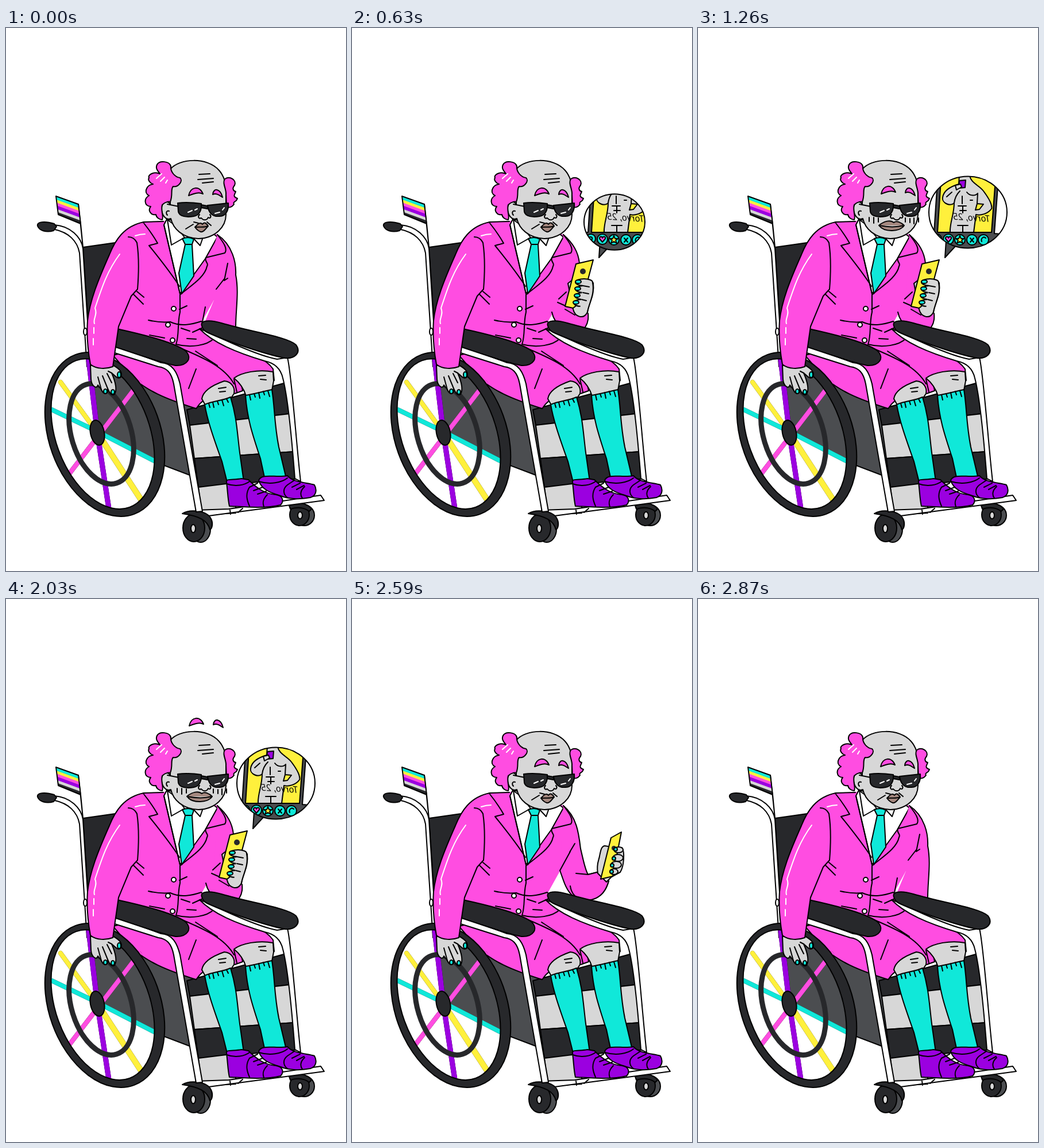
Write an HTML page that moves like this. It is 592 by 946 pixels and loops after 2940 ms.

```html
<!DOCTYPE html>
<html lang="en">
<head>
<meta charset="utf-8">
<title>Swipe surprise</title>
<style>
html, body { margin: 0; width: 100%; height: 100%; overflow: hidden; background: #fff; }
svg { display: block; width: 100%; height: 100%; stroke: #000; stroke-width: 2; stroke-linejoin: round; stroke-linecap: round; fill: none; }
.p { fill: #ff4de1; } .s { fill: #d7d7d7; } .k { fill: #27282b; } .d { fill: #4b4d50; }
.c { fill: #10e8d9; } .v { fill: #9b00e0; } .y { fill: #fff03c; } .w { fill: #fff; } .l { fill: #a5887f; }
.n { stroke: none; } .hi { stroke: #fff; }
.spoke path { stroke-width: 8; } .spoke use { stroke-width: 4; }
text { font: italic 16px "Open Sans", sans-serif; fill: #000; stroke: none; }
</style>
</head>
<body>
<svg viewBox="0 0 592 946">
<defs>
  <clipPath id="flag"><path d="M87 293L126 307L130 341L91 325Z"/></clipPath>
  <clipPath id="lens"><ellipse class="round"/></clipPath>
</defs>

<!-- flag and chair back -->
<path class="w" d="M126 307L134 382L130 341"/>
<g clip-path="url(#flag)" class="n">
  <g transform="translate(86 292.500) skewY(20)">
    <path class="c" d="M0 0H46V7H0Z"/><path class="y" d="M0 6H46V12H0Z"/><path class="p" d="M0 11H46V17H0Z"/>
    <path class="v" d="M0 16H46V23H0Z"/><path class="s" d="M0 22H46V28H0Z"/><path class="k" d="M0 27H46V36H0Z"/>
  </g>
</g>
<path d="M87 293L126 307L130 341L91 325Z"/>
<path class="k" d="M134 382L190 374L205 400L150 510L142 500Z"/>
<path class="w" d="M84 343C112 345 131 364 134 384L147 590H141L128 392C124 370 108 356 85 351Z"/>
<path class="k" d="M55 345C53 337 68 336 84 341L88 346L83 353C70 357 58 353 55 345Z"/>
<ellipse class="w" cx="138" cy="529" rx="3" ry="6"/>

<!-- seat side and calf straps -->
<path class="d" d="M147 590H215L325 660L333 784L262 757L155 700Z"/>
<path class="k" d="M315 665L487 618L494 672L320 692Z"/>
<path class="s" d="M320 692L494 672L502 738L328 750Z"/>
<path class="k" d="M328 750L502 738L510 785L335 800Z"/>
<path class="s" d="M335 800L400 792V845L341 848Z"/>

<!-- shorts and legs -->
<path class="p" d="M186 570L300 545L362 540C410 560 450 572 465 594L467 614L455 602L408 610L412 632L398 637C340 640 338 655 331 663C290 650 235 632 205 592Z"/>
<path d="M300 556C345 575 380 590 397 620M330 563L368 588M318 628L331 594"/>
<path class="s" d="M341 646C343 632 360 622 380 615C394 616 399 628 397 637L391 646L347 657Z"/>
<path class="s" d="M397 610C410 600 440 594 465 599L466 615L463 631L418 641C414 628 407 618 397 610Z"/>
<path d="M370 628L383 626M372 634L382 633M440 606L452 605M443 612L453 613M397 612L402 634"/>
<path class="c" d="M346 656C360 650 378 649 391 643C402 680 402 700 407 740L414 790L386 795L376 755C358 705 350 680 346 656Z"/>
<path class="c" d="M417 640C430 638 448 633 463 630C468 660 467 690 475 730L488 785L452 792L443 750C428 705 420 680 417 640Z"/>
<path d="M353 654L355 661M360 652L362 661M368 650L370 656M376 648L379 658M384 646L387 652M424 639L426 648M432 637L434 643M440 635L442 645M448 633L450 639M456 632L459 642"/>

<!-- jacket -->
<path class="p n" d="M213 350L240 338L275 336L368 360C390 380 392 410 386 428L362 474L341 512L362 541C350 553 322 558 296 551L190 545L200 500Z"/>
<path class="w" d="M280 333L275 343L303 463L347 402L368 364L350 350Z"/>

<!-- far arm -->
<g id="rest">
  <path class="p n" d="M368 360C395 378 401 410 400 430C406 460 400 490 400 530L345 515L362 474L350 420Z"/>
  <path d="M368 360C395 378 401 410 400 430C406 460 400 490 400 520M386 410L380 440L386 436M347 486L342 512M380 437L366 455"/>
</g>
<g id="out">
  <path class="p n" d="M368 360C392 380 395 410 398 435C404 460 406 472 411 480L427 476L447 491C442 510 430 524 408 525C385 525 375 510 368 490L362 473L365 420Z"/>
  <path d="M368 360C392 380 395 410 398 435C404 460 406 472 411 480L427 476L447 491C442 510 430 524 408 525C385 525 375 510 368 490L362 473M388 426L379 441M362 473L380 440M395 486L411 480"/>
</g>
<g id="swing">
  <path class="p" d="M390 478L411 480L427 476L447 491C442 510 430 524 408 525C392 524 382 515 380 500"/>
  <path class="s" d="M428 478C425 462 430 455 431 448C433 438 434 431 440 430L452 432L470 433C475 440 474 465 467 476L452 484L443 493Z"/>
  <path class="y" d="M451 416L469 406L454 483L433 488Z"/>
  <circle class="k n" cx="456" cy="434" r="4"/>
  <g class="s"><ellipse cx="464" cy="437" rx="8" ry="5"/><ellipse cx="463" cy="451" rx="9" ry="6"/><ellipse cx="460" cy="463" rx="9" ry="6"/><ellipse cx="456" cy="475" rx="7" ry="5"/></g>
  <g class="c"><circle cx="459" cy="436" r="3"/><circle cx="456" cy="452" r="3"/><circle cx="453" cy="464" r="3"/><circle cx="452" cy="475" r="3"/></g>
</g>
<g id="near">
  <path class="p n" d="M368 360C385 375 394 390 396 410L402 500L411 497C413 515 405 530 388 530C370 530 352 515 348 495L362 475L365 420Z"/>
  <path d="M368 360C385 375 394 390 396 410M411 497C413 515 405 530 388 530C370 530 352 515 348 495M358 478L376 486M360 472L373 460M371 490L388 500"/>
  <path class="s" d="M376 445C390 432 412 434 420 444C423 465 412 480 410 495C403 509 388 503 385 490Z"/>
  <path class="y" d="M390 411L420 404L401 475L385 488L371 485Z"/>
  <circle class="k n" cx="402" cy="424" r="5"/>
  <g class="s"><ellipse cx="404" cy="443" rx="15" ry="6"/><ellipse cx="404" cy="455" rx="15" ry="6"/><ellipse cx="403" cy="467" rx="15" ry="6"/><ellipse cx="399" cy="479" rx="13" ry="6"/></g>
  <path class="s n" d="M403 438L420 445C422 465 413 480 409 494L397 490Z"/>
  <path d="M419 444C423 465 412 480 410 495M402 449L413 451M402 461L412 463M400 473L408 475"/>
  <g class="c"><ellipse cx="394" cy="442" rx="5" ry="3"/><ellipse cx="393" cy="454" rx="5" ry="3"/><ellipse cx="392" cy="466" rx="5" ry="3"/><ellipse cx="390" cy="478" rx="5" ry="3"/></g>
</g>

<!-- jacket lines, shirt, tie -->
<path d="M213 350L240 338L274 337M240 340C252 355 260 368 264 375L249 379C270 405 286 425 302 450M275 343L303 463M368 360C380 375 386 385 381 392L348 400C345 408 354 409 350 415C346 435 320 450 304 464M303 463V495C298 515 302 535 296 551C322 558 350 553 362 541L341 512"/>
<path d="M248 509C265 513 275 513 286 512C305 521 325 516 340 511M250 535L276 540M305 523L320 528M302 490L315 484M315 541L331 542M222 464L239 481M228 459L240 469M325 530L347 520"/>
<path class="w" d="M281 334L288 378L311 365L296 345ZM325 365L338 379L345 359Z"/>
<path class="c" d="M312 377L324 377L327 432L306 463L301 427Z"/>
<path class="c" d="M307 367C315 364 322 365 327 368L324 377H312Z"/>
<g class="w"><circle cx="292" cy="489" r="4"/><circle cx="282" cy="517" r="4"/><circle cx="290" cy="544" r="4"/></g>

<!-- head -->
<path class="s" d="M286 246C302 227 350 224 371 248C382 260 384 275 383 292V325C383 346 365 366 335 367C308 366 291 350 287 332C278 336 270 325 271 312C273 302 283 300 286 308Z"/>
<path class="p" d="M287 241C285 232 267 230 263 238C259 246 267 251 268 254C258 249 246 256 249 261C246 265 252 271 256 272C243 274 240 288 249 292C240 297 240 310 252 311C246 318 253 327 261 325C262 331 268 334 272 334C275 328 269 318 272 308C278 302 285 302 286 303C291 290 286 281 291 276C300 278 309 266 303 261C294 260 286 250 287 241Z"/>
<path class="p" d="M381 263C390 257 402 265 398 274C393 280 396 284 400 285C398 291 394 293 403 297C401 304 394 302 397 307C391 316 386 310 384 314L383 290C384 280 376 271 381 263Z"/>
<path class="hi" d="M262 262L271 254M269 267L276 260M278 270L281 265"/>
<path d="M336 255L355 254M334 264L361 262M342 270L361 268M284 319C279 317 278 323 281 326M281 307L301 311"/>
<path class="k" d="M299 305C312 303 326 304 340 306C341 316 337 327 327 328C315 330 302 329 300 320ZM340 308L351 310V315L340 313ZM351 309L387 305C388 316 384 328 372 328C360 329 353 324 351 309Z"/>
<path class="hi" d="M317 321L324 318M329 317L333 315M364 323L372 321M377 317L380 313"/>
<path d="M337 325C333 329 336 333 340 331C344 336 350 335 352 330C356 333 358 328 355 325"/>
<g id="brows" class="p">
  <path d="M318 292C321 276 337 274 343 289C335 285 326 289 318 292Z"/>
  <path d="M360 290C361 278 373 279 377 295C372 292 367 287 360 290Z"/>
</g>
<g id="calm">
  <path d="M313 350L326 342M327 338L335 340M350 338L357 344"/>
  <path class="l" d="M329 347C335 340 339 338 342 342C345 337 349 340 352 345C346 352 343 356 339 355C335 354 332 351 329 347ZM329 347C338 346 345 348 352 345"/>
</g>
<g id="shock">
  <path d="M298 330V337M306 330V340M314 331V338M361 331V338M369 332V339M376 331V341M384 331V338"/>
  <path class="l" d="M315 344C324 336 335 334 341 339C346 335 354 339 359 344C352 355 325 357 315 344ZM315 344C330 347 347 347 359 344"/>
</g>

<!-- right rail and pad -->
<path class="w" d="M350 529C400 553 445 572 472 577L490 574C497 600 505 720 513 790L503 785C498 720 490 640 482 610C478 592 465 583 450 580C400 565 360 548 337 524Z"/>
<path class="k" d="M341 519C337 509 355 508 375 514C430 530 490 538 505 552C515 566 502 577 485 575C450 568 385 546 352 531C345 528 342 524 341 519Z"/>

<!-- footplate, shoes, casters -->
<g id="caster">
  <ellipse class="d" cx="519" cy="849" rx="18" ry="18"/>
  <ellipse class="k" cx="511" cy="848" rx="17" ry="19"/>
  <ellipse class="s" cx="512" cy="849" rx="4" ry="6"/>
  <path class="k" d="M493 832C505 825 525 827 532 838L528 842C518 834 505 835 495 838Z"/>
</g>
<path class="w" d="M330 840L388 838L548 814L554 823L412 842L345 851Z"/>
<path d="M390 840L391 847M404 844L412 837"/>
<path class="v" d="M440 788C445 775 470 784 490 780C500 792 525 792 537 796C542 805 540 815 530 818C510 822 490 820 478 815C462 810 445 805 440 788Z"/>
<path class="v" d="M384 792C382 784 395 788 410 785L422 787C435 800 450 812 470 813C483 815 484 825 478 831C450 838 410 834 389 833C386 820 386 805 384 792Z"/>
<path d="M384 794C400 800 416 796 424 790M424 800L438 793M431 806L447 800M438 812L453 807M424 800C416 812 420 824 424 833M455 813C448 820 446 826 449 834M440 790C460 796 480 792 490 784M490 796L502 788M498 800L512 793M506 804L519 797M490 796C480 804 484 814 490 818M520 799C512 806 512 814 516 819"/>
<ellipse class="d" cx="339" cy="873" rx="17" ry="23"/>
<ellipse class="k" cx="327" cy="871" rx="19" ry="24"/>
<ellipse class="s" cx="326" cy="872" rx="4" ry="7"/>
<path class="k" d="M307 846C320 838 350 840 357 855C361 863 359 872 355 874C351 857 335 850 307 846Z"/>

<!-- big wheel -->
<g class="spoke">
  <path id="s1" d="M95 617L159 705"/><use href="#s1" style="stroke:#fff03c"/>
  <path id="s2" d="M159 705L234 820" style="stroke-width:10"/><use href="#s2" style="stroke:#fff03c"/>
  <path id="s3" d="M232 618L106 782"/><use href="#s3" style="stroke:#ff4de1"/>
  <path id="s4" d="M80 665L159 703L258 754"/><use href="#s4" style="stroke:#10e8d9"/>
  <path id="s5" d="M144 578L159 705L179 837" style="stroke-width:9"/><use href="#s5" style="stroke:#9b00e0"/>
</g>
<ellipse cx="166" cy="707" rx="52" ry="90" transform="rotate(-17 166 707)" style="stroke:#27282b;stroke-width:9"/>
<ellipse class="k" cx="159" cy="705" rx="12" ry="22" transform="rotate(-12 159 705)"/>
<path class="k" fill-rule="evenodd" transform="translate(172 708) rotate(-20)" d="M-97 0A97 148 0 1 1 97 0A97 148 0 1 1 -97 0ZM-85 -2A82 136 0 1 1 79 -2A82 136 0 1 1 -85 -2Z"/>

<!-- left rail and pad -->
<path class="w" d="M188 553L270 583C290 584 298 600 303 620L342 842L331 843L292 620C288 600 280 592 265 590L186 565Z"/>
<path class="k" d="M193 524C230 532 290 546 312 562C326 575 315 589 295 588C265 582 225 567 188 555Z"/>

<!-- near arm on the wheel -->
<path class="s" d="M147 588L185 587C196 592 204 600 200 608C195 613 190 606 184 601C190 615 194 630 189 638C184 642 180 635 177 628C178 640 170 639 166 630L160 622C158 630 149 624 148 612Z"/>
<path d="M166 630L160 608M177 628L168 606M184 618L176 602M184 601L178 598"/>
<g class="c"><ellipse cx="197" cy="604" rx="3" ry="5"/><ellipse cx="186" cy="634" rx="3" ry="4"/><ellipse cx="173" cy="633" rx="3" ry="4"/></g>
<path class="p" d="M240 338C205 345 190 370 180 395C160 440 146 475 142 510C140 540 144 570 147 586C158 595 175 594 186 590L196 520L218 467L229 455C231 430 232 400 228 374C224 366 218 364 213 364"/>
<path class="hi" d="M225 362C231 360 236 359 242 359M198 394C175 425 166 455 155 488C160 500 151 506 154 515M153 522V532M152 541V552"/>

<!-- thought bubble -->
<g id="bubble">
  <path id="tail" class="d" d="M432 370L430 400L452 376Z"/>
  <g clip-path="url(#lens)">
    <path class="w n" d="M400 250H540V390H400Z"/>
    <path class="d" d="M418 250H524L516 358L540 360V400H400V356H411Z"/>
    <path class="y" d="M424 250H519L511 356H417Z"/>
    <path class="s" d="M455 256H473C474 270 490 274 497 284C506 296 513 308 511 315C504 324 492 327 484 325L480 356H439C438 340 446 325 446 305C438 312 424 304 426 295C428 282 440 276 454 272Z"/>
    <path class="y" d="M486 306L497 307L490 316L483 317Z"/>
    <path d="M446 305C447 296 452 288 456 284M468 286C474 294 484 292 487 288M487 288L486 306M460 293V306M453 310H467M456 318H467M461 310V322M452 344H470M461 345V356M433 294L442 286M474 300H478"/>
    <path class="v" d="M455 266L466 265L465 278L454 279Z"/>
    <path class="s" d="M448 274L457 272L459 277L450 282Z"/>
    <text transform="translate(508 338) scale(-1 1) rotate(-4)">Torvo, 25</text>
    <g class="c"><circle cx="416" cy="367" r="8"/><circle cx="436" cy="368" r="9"/><circle cx="456" cy="369" r="9"/><circle cx="477" cy="369" r="9"/><circle cx="497" cy="369" r="9"/></g>
    <path class="p" d="M436 373L431 367C431 362 436 363 436 366C437 362 442 363 441 367Z"/>
    <path class="y" d="M456 362L458 367H463L459 370L461 375L456 372L451 375L453 370L449 367H454Z"/>
    <path d="M474 366L480 373M480 366L474 373M501 366C497 362 492 367 494 372M414 364C420 363 419 369 415 371"/>
  </g>
  <ellipse class="round"/>
</g>
</svg>
<script>
const STEP = 70, COUNT = 42;
const GROW = [.2, .42, .6, .78, .9, 1];
const BROWS = { 12: -10, 13: -40, 14: -90, 15: -130, 16: -150, 17: -71, 29: -71, 30: -30 };
const el = id => document.getElementById(id);
const show = (id, on) => { el(id).style.display = on ? '' : 'none'; };
const rounds = document.querySelectorAll('.round');

function setBubble(size) {
  show('bubble', size > 0);
  const box = { cx: 411 + 59 * size, cy: 398 - 77 * size, rx: 68 * size, ry: 62.5 * size };
  for (const e of rounds) for (const k in box) e.setAttribute(k, box[k]);
  const t = Math.min(1, size * 1.3);
  el('tail').setAttribute('transform', `translate(430 400) scale(${t}) translate(-430 -400)`);
}

function draw(k) {
  // the way back mirrors the way in
  const m = k < 29 ? k : COUNT - 1 - k;
  show('rest', m < 4);
  show('out', m === 4);
  show('swing', m > 0 && m < 5);
  show('near', m > 4);
  el('swing').setAttribute('transform', `rotate(${[0, 55, 35, 15, 0][m] || 0} 392 500)`);
  setBubble(m < 6 ? 0 : GROW[Math.min(m - 6, 5)]);

  const shocked = k > 12 && k < 31;
  show('shock', shocked);
  show('calm', !shocked);
  const lift = BROWS[k] ?? (shocked ? -3 : 0);
  el('brows').setAttribute('transform', `translate(${shocked ? 1 : 0} ${lift})`);
}

let last = -1;
function tick() {
  const k = Math.floor(performance.now() / STEP) % COUNT;
  if (k !== last) draw(last = k);
  requestAnimationFrame(tick);
}
tick();
</script>
</body>
</html>
```
